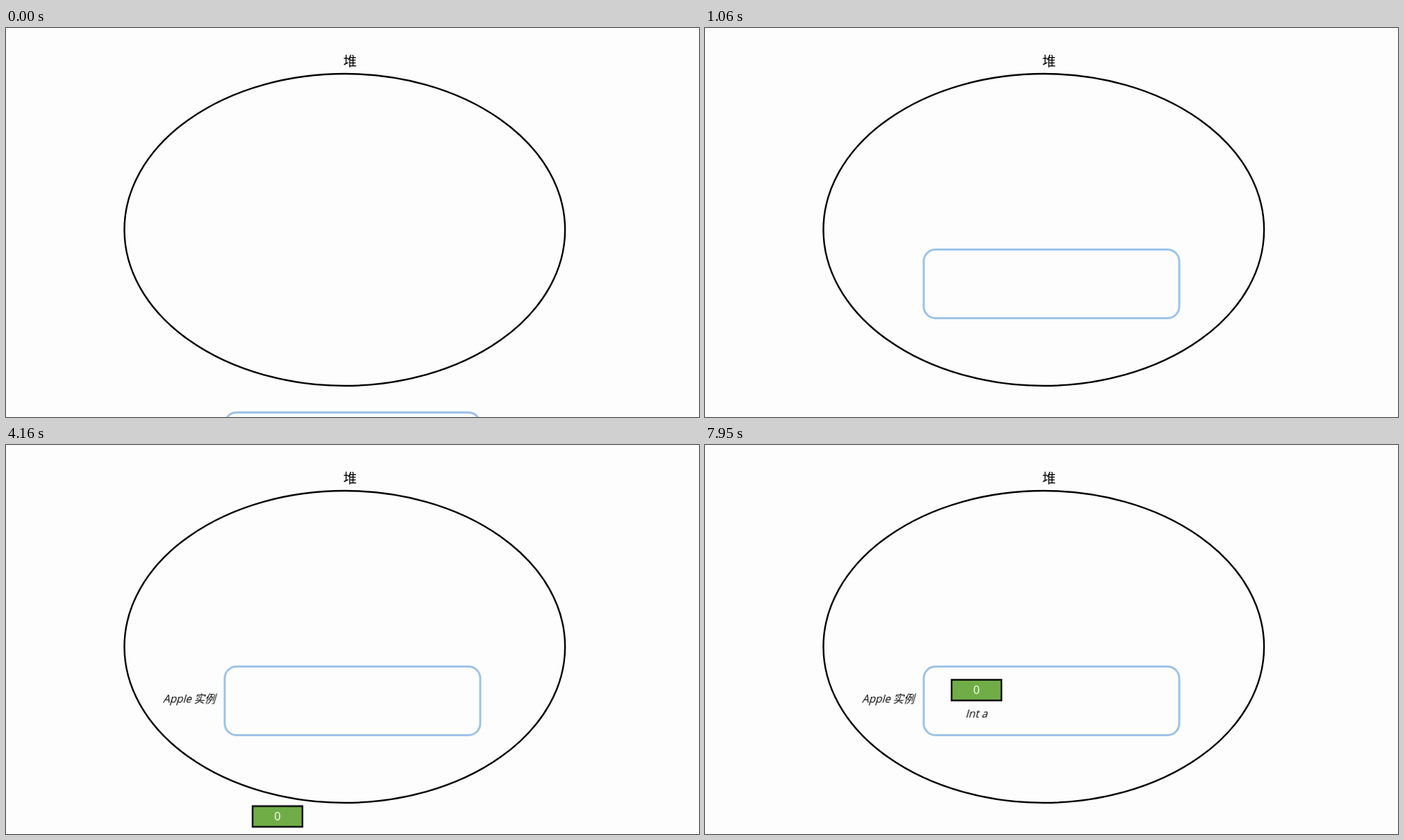
These frames come from a looping animation (998x561 px, 7.99 s). An HTML page:

```html
<!DOCTYPE html>
<html lang="zh-CN">
<head>
<meta charset="utf-8">
<title>堆</title>
<style>
  html, body { margin: 0; width: 100%; height: 100%; overflow: hidden; background: #fdfdfd; }
  svg { display: block; width: 998px; height: 561px; }
  text { font-family: "Open Sans", "Noto Sans CJK SC", "Noto Sans CJK", sans-serif; font-size: 15.3px; }
  .title { font-size: 19.5px; text-anchor: middle; }
  .value { font-size: 16.5px; text-anchor: middle; fill: #fff; }
</style>
</head>
<body>
<svg viewBox="0 0 998 561">
  <ellipse cx="487.8" cy="291" rx="317.3" ry="225" fill="none" stroke="#000" stroke-width="2.4"/>
  <text class="title" x="495.5" y="55.3">堆</text>
  <rect id="box" x="315" y="319.5" width="368" height="99" rx="17" fill="none" stroke="#9dc3e6" stroke-width="3"/>
  <text id="owner" transform="translate(226 371.3) skewX(-16)">Apple 实例</text>
  <g id="cell">
    <rect x="355.1" y="338.6" width="71.8" height="29.8" fill="#70ad47" stroke="#000" stroke-width="2.4"/>
    <text class="value" x="391" y="359.4">0</text>
  </g>
  <text id="field" transform="translate(375 392.8) skewX(-16)">Int a</text>
</svg>
<script>
  const LOOP = 7990;

  // Each step: [time in ms, style]; linear between steps.
  function play(id, steps) {
    const frames = steps.map(([ms, style]) => ({ offset: ms / LOOP, ...style }));
    const anim = document.getElementById(id).animate(frames, { duration: LOOP, iterations: Infinity });
    anim.startTime = 0;
  }

  const drop = y => ({ transform: `translateY(${y}px)` });
  const alpha = opacity => ({ opacity });
  const fadeIn = (id, from, to) =>
    play(id, [[0, alpha(0)], [from, alpha(0)], [to, alpha(1)], [LOOP, alpha(1)]]);

  play("box", [[0, drop(235)], [971, drop(0)], [LOOP, drop(0)]]);
  fadeIn("owner", 1980, 2980);
  play("cell", [[0, drop(225)], [3978, drop(223)], [4978, drop(0)], [LOOP, drop(0)]]);
  fadeIn("field", 5940, 6940);
</script>
</body>
</html>
```
